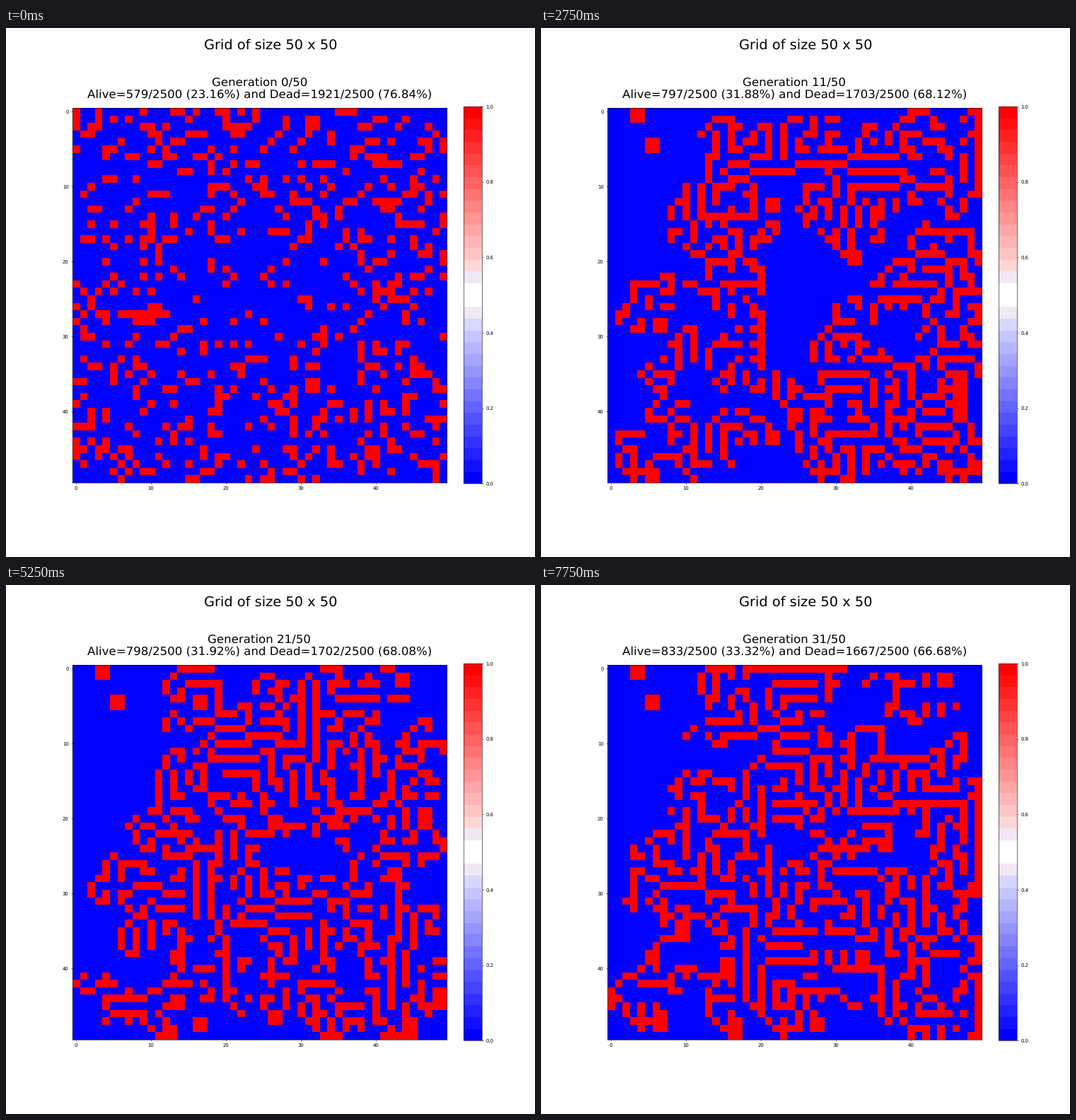
Animation of 748x748 px, one loop 8000 ms. Source, as a matplotlib script:

```python
import numpy as np
import matplotlib.pyplot as plt
from matplotlib.animation import FuncAnimation
from matplotlib.colors import ListedColormap

SIZE, STEPS, TOTAL = 50, 32, 50
START_ALIVE = 579

plt.rcParams["text.hinting"] = "no_hinting"


def seed_grid():
    """Scatter the first cells, more thinly around the middle."""
    rng = np.random.RandomState(7)
    y, x = np.mgrid[:SIZE, :SIZE]
    middle = ((x - 23) / 13) ** 2 + ((y - 23) / 7) ** 2 < 1
    weight = np.where(middle, 0.35, 1.0).ravel()
    cells = rng.choice(SIZE * SIZE, START_ALIVE, replace=False,
                       p=weight / weight.sum())
    grid = np.zeros(SIZE * SIZE, int)
    grid[cells] = 1
    return grid.reshape(SIZE, SIZE)


def evolve(grid):
    """One Life sweep, updated in place so later cells see earlier changes.

    Everything beyond the border is dead.
    """
    p = np.pad(grid, 1).tolist()
    for r in range(1, SIZE + 1):
        for c in range(1, SIZE + 1):
            block = sum(sum(row[c - 1:c + 2]) for row in p[r - 1:r + 2])
            near = block - p[r][c]
            p[r][c] = int(near == 3 or (near == 2 and p[r][c] == 1))
    return np.array(p)[1:-1, 1:-1]


def make_cmap():
    colors = plt.get_cmap("bwr", 32)(np.arange(32))
    colors[15:17, :3] = 1
    colors[[14, 17], :3] = 0.94, 0.91, 0.95
    return ListedColormap(colors)


grids = [seed_grid()]
while len(grids) < STEPS:
    grids.append(evolve(grids[-1]))

fig, ax = plt.subplots(figsize=(15, 15), dpi=748 / 15)
fig.suptitle("Grid of size 50 x 50", fontsize=28)
image = ax.imshow(grids[0], cmap=make_cmap(), vmin=0, vmax=1,
                  interpolation="nearest")
fig.colorbar(image, fraction=0.046, pad=0.04)
title = ax.set_title("", fontsize=24, pad=20)


def share(name, count):
    cells = SIZE * SIZE
    return f"{name}={count}/{cells} ({100 * count / cells:.2f}%)"


def draw(n):
    alive = int(grids[n].sum())
    image.set_data(grids[n])
    title.set_text(f"Generation {n}/{TOTAL}\n{share('Alive', alive)} and "
                   f"{share('Dead', SIZE * SIZE - alive)}")
    return image, title


anim = FuncAnimation(fig, draw, frames=STEPS, interval=250,
                     repeat=True, repeat_delay=0, blit=False)
plt.show()
```
